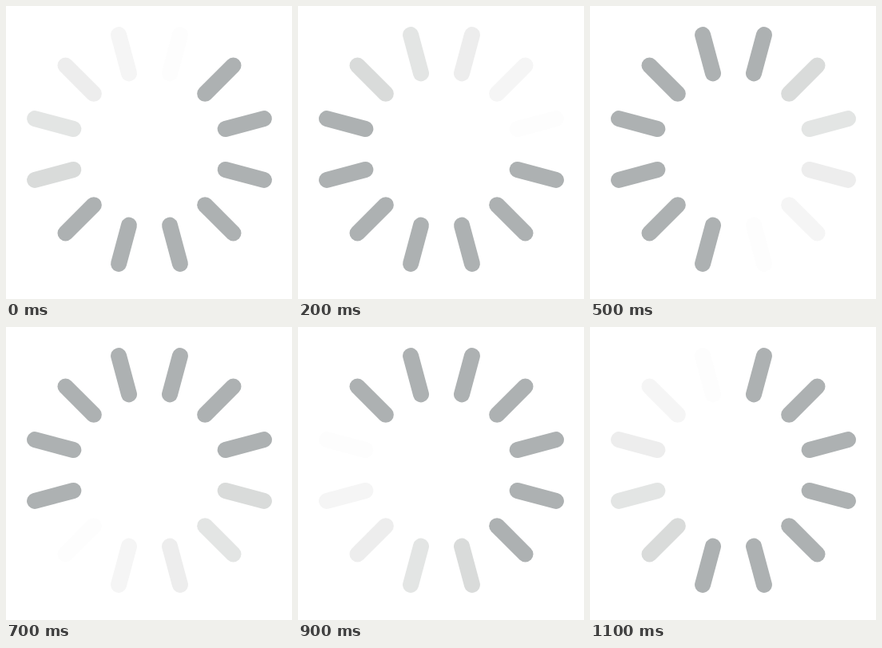
Recreate the animation shown at these times as an HTML page. Size 358 by 367 pixels, loop 1.2 s.

```html
<!DOCTYPE html>
<html lang="en">
<head>
<meta charset="utf-8">
<title>Loading spinner</title>
<style>
  html, body { margin: 0; width: 100%; height: 100%; overflow: hidden; background: #fff; }
  svg { display: block; width: 358px; height: 367px; }
</style>
</head>
<body>
<svg viewBox="0 0 358 367" stroke-width="20" stroke-linecap="round"></svg>
<script>
  const COUNT = 12, STEP_MS = 100;
  const CENTER = 179.5, INNER = 98.5, OUTER = 148.5;
  const BASE = '#adb1b2';
  // Colours from the leading bar backwards; all later bars use BASE.
  const TRAIL = ['#fdfdfd', '#f5f5f5', '#ededed', '#e3e5e4', '#d9dbda'];

  const svg = document.querySelector('svg');

  function makeBar(index) {
    const bar = document.createElementNS('http://www.w3.org/2000/svg', 'line');
    const angle = (15 + index * 360 / COUNT) * Math.PI / 180;
    [INNER, OUTER].forEach((radius, i) => {
      bar.setAttribute('x' + (i + 1), CENTER + radius * Math.sin(angle));
      bar.setAttribute('y' + (i + 1), CENTER - radius * Math.cos(angle));
    });
    svg.append(bar);
    return bar;
  }

  const bars = Array.from({ length: COUNT }, (_, i) => makeBar(i));

  function render(ms) {
    const lead = Math.floor(ms / STEP_MS) % COUNT;
    bars.forEach((bar, i) => {
      const age = (lead - i + COUNT) % COUNT;
      bar.setAttribute('stroke', TRAIL[age] || BASE);
    });
  }

  const start = performance.now();
  function tick() {
    render(performance.now() - start);
    requestAnimationFrame(tick);
  }
  tick();
</script>
</body>
</html>
```
